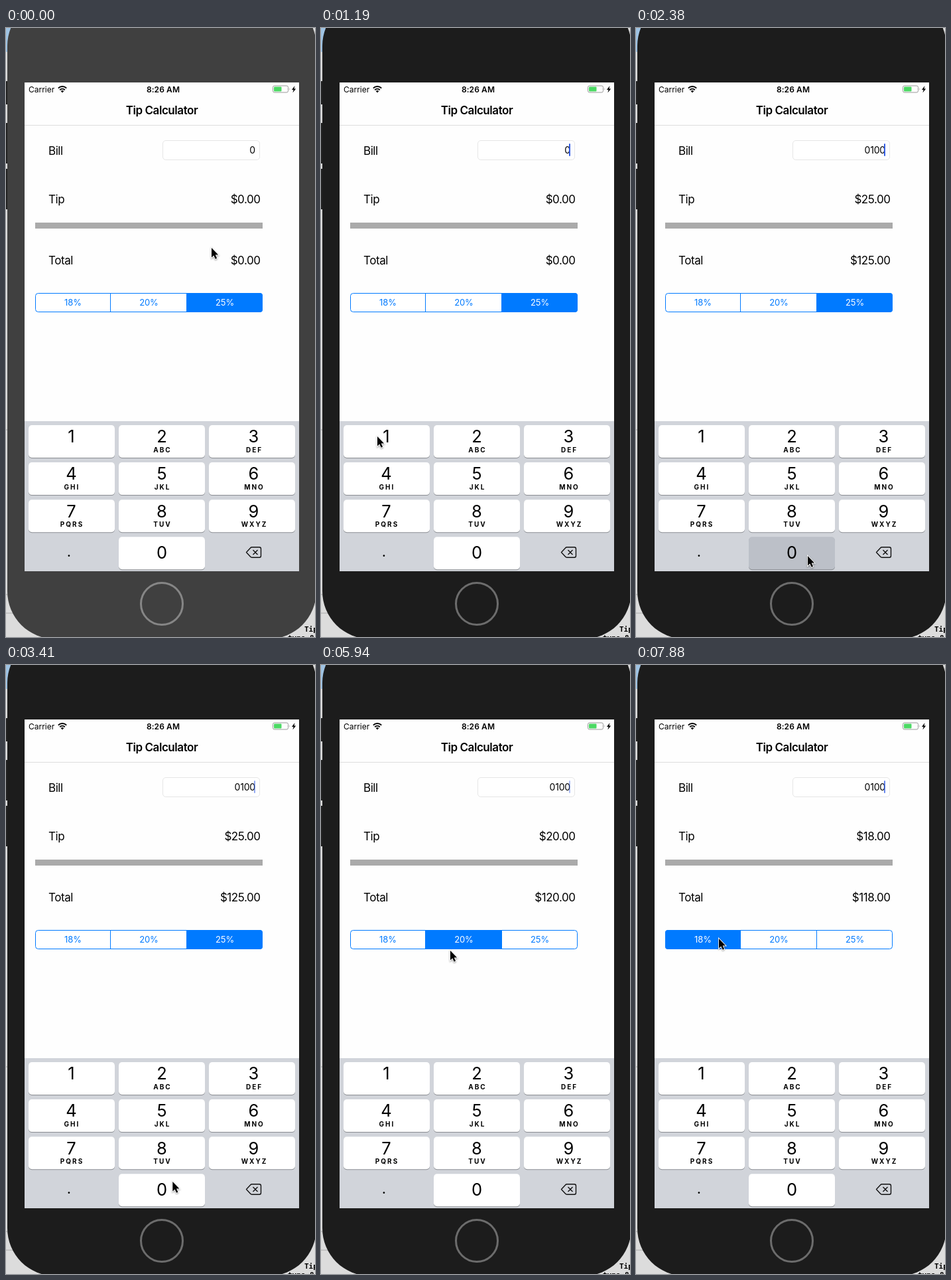
These frames come from a looping animation (466x917 px, 8000 ms). An HTML page:

```html
<!DOCTYPE html>
<html lang="en">
<head>
<meta charset="utf-8">
<title>Tip Calculator</title>
<style>
html, body { margin: 0; width: 100%; height: 100%; overflow: hidden; background: #dcdcdc; }
svg { display: block; width: 466px; height: 917px; font-family: Inter, sans-serif; }
.label { font-size: 17px; letter-spacing: -.45px; }
.end { text-anchor: end; }
.mid { text-anchor: middle; }
.digit { font-size: 25.5px; }
.letters { font-size: 10px; font-weight: 700; letter-spacing: 2px; }
.seg { font-size: 13px; letter-spacing: -.1px; }
.mono { font: 700 11px "DejaVu Sans Mono", monospace; }
.bold { font-weight: 600; }
</style>
</head>
<body>
<svg viewBox="0 0 466 917">
  <rect width="466" height="917" fill="#dcdcdc"/>
  <rect width="12" height="36" fill="#9fc3e3"/>
  <path d="M0 605h3M0 853h6M0 881h30" stroke="#aaa"/>
  <text class="mono" x="450" y="909">Tip</text>
  <text class="mono" x="425" y="922">type 8</text>
  <path d="M0 80h4v35h-4zM0 143h4v61h-4zM0 212h4v61h-4z" fill="#222"/>
  <rect id="body" x="2" y="-45" width="466" height="965" rx="72"/>
  <circle id="home" cx="235" cy="867" r="31.5" fill="none" stroke-width="3"/>
  <rect x="28" y="82" width="414" height="736" fill="#fefefe"/>

  <text x="34" y="97" font-size="12">Carrier</text>
  <g fill="none" stroke="#000" stroke-width="2">
    <path d="M78.8 90.6a9 9 0 0 1 12.4 0M81.2 93.2a5.6 5.6 0 0 1 7.6 0"/>
  </g>
  <path d="M85 97.5l-2.3-2.4a3.3 3.3 0 0 1 4.6 0z"/>
  <text class="mid bold" x="237" y="97" font-size="12" letter-spacing=".1">8:26 AM</text>
  <rect x="402.5" y="87" width="23" height="10" rx="2.3" fill="none" stroke="#999"/>
  <rect x="404" y="88.5" width="11.5" height="7" rx="1" fill="#4cd964"/>
  <path d="M427 90v4q1.5-2 0-4z" fill="#999"/>
  <path d="M435.5 87l-4.5 6h2.6l-1.2 4.5 4.8-6h-2.7z"/>

  <text class="label mid bold" x="235" y="130">Tip Calculator</text>
  <path d="M28 146.5h414" stroke="#dedede"/>
  <text class="label" x="64" y="191">Bill</text>
  <text class="label" x="64" y="264">Tip</text>
  <text class="label" x="64" y="356">Total</text>
  <rect x="236.5" y="169.5" width="146" height="29" rx="4.5" fill="#fff" stroke="#e6e6e6"/>
  <text id="bill" class="end" x="376" y="189" font-size="14" letter-spacing="-.2"></text>
  <rect id="caret" x="374" y="174" width="2" height="19" rx="1" fill="#3560e6"/>
  <text id="tip" class="label end" x="383.5" y="264"></text>
  <text id="total" class="label end" x="383.5" y="356"></text>
  <path d="M44 293h343v9H44z" fill="#aaa"/>
  <clipPath id="round"><rect x="44" y="399" width="343" height="29" rx="4"/></clipPath>
  <g id="segments" clip-path="url(#round)"></g>
  <path d="M157.5 400v27M272.5 400v27" stroke="#007aff"/>
  <rect x="44.5" y="399.5" width="342" height="28" rx="4" fill="none" stroke="#007aff"/>

  <path d="M28 592h414v226H28z" fill="#d1d4da"/>
  <g id="keys"></g>
  <text class="mid" x="95" y="796" font-size="22">.</text>
  <path d="M362.5 789.5l6-6.5q1-1.2 2.5-1.2h11q2.5 0 2.5 2.5v10.4q0 2.5-2.5 2.5h-11q-1.5 0-2.5-1.2zM372.5 786l7 7M379.5 786l-7 7"
        fill="none" stroke="#111" stroke-width="1.4" stroke-linejoin="round"/>
  <path id="cursor" d="M0 0v14.6l3.3-3.1 2.4 5.3 2.4-1-2.4-5.2h4.4z" stroke="#fff" stroke-width="1.8"
        paint-order="stroke" style="filter:drop-shadow(0 1px 1px #0006)"/>
</svg>
<script>
const $ = id => document.getElementById(id);
const LOOP = 8000, STEP = 148.6;
const RATES = [18, 20, 25], EDGES = [44, 157.5, 272.5, 387];
const CENTERS = [98.5, 235, 373.5];
const LETTERS = ['', 'ABC', 'DEF', 'GHI', 'JKL', 'MNO', 'PQRS', 'TUV', 'WXYZ'];

// time, x, y of the pointer
const PATH = [
  [0, 310, 331], [1040, 85, 615], [1400, 85, 615], [1790, 263, 802], [2200, 259, 795],
  [3340, 259, 795], [3900, 113, 470], [4450, 192, 413], [4750, 228, 411], [5040, 212, 411],
  [5400, 210, 412], [5940, 195, 430], [6380, 127, 413], [6530, 125, 411], [8000, 125, 412]
];
// key, moment its digit appears, moment the key is released
const PRESSES = [[1, 1330, 1480], [0, 1930, 2075], [0, 2370, 2520]];

$('segments').innerHTML = RATES.map((rate, i) =>
  `<rect id="seg${i}" x="${EDGES[i]}" y="399" width="${EDGES[i + 1] - EDGES[i]}" height="29"/>
   <text id="rate${i}" class="seg mid" x="${[101, 215.5, 330][i]}" y="418">${rate}%</text>`).join('');

function keyMarkup(digit, col, row, letters) {
  const x = 34 + col * 136, y = 598 + row * 56.1;
  return `<rect x="${x}" y="${y + 1}" width="130" height="49" rx="5" fill="#898c91"/>
    <rect id="key${digit}" x="${x}" y="${y}" width="130" height="49" rx="5"/>
    <text class="digit mid" x="${CENTERS[col]}" y="${y + (digit ? 26.3 : 32.5)}">${digit}</text>
    <text class="letters mid" x="${CENTERS[col] + 1}" y="${y + 41}">${letters}</text>`;
}
$('keys').innerHTML = LETTERS.map((s, i) => keyMarkup(i + 1, i % 3, Math.floor(i / 3), s)).join('')
  + keyMarkup(0, 1, 3, '');
for (let d = 0; d < 10; d++) $('key' + d).setAttribute('fill', '#fff');

const clamp = v => Math.max(0, Math.min(1, v));

function pointer(t) {
  const i = Math.max(1, PATH.findIndex(p => p[0] >= t));
  const [t0, x0, y0] = PATH[i - 1], [t1, x1, y1] = PATH[i];
  const u = clamp((t - t0) / (t1 - t0)), e = u * u * (3 - 2 * u);
  return [x0 + (x1 - x0) * e, y0 + (y1 - y0) * e];
}

function caretOpacity(t) {
  if (t > 1180 && t < 2830) return 1;
  const origin = t < 1180 ? 100 : 410;
  const phase = ((t - origin + 1100) / 1000) % 1;
  return Math.min(clamp(phase / .2), clamp((.71 - phase) / .19));
}

function draw(t) {
  const active = t > 1180;
  $('body').setAttribute('fill', active ? '#1c1c1c' : '#404040');
  $('home').setAttribute('stroke', active ? '#6c6c6c' : '#868686');

  const bill = '0' + PRESSES.filter(p => t >= p[1]).map(p => p[0]).join('');
  const chosen = t < 5330 ? 2 : t < 6970 ? 1 : 0;
  const tip = bill * RATES[chosen] / 100;
  $('bill').textContent = bill;
  $('tip').textContent = '$' + tip.toFixed(2);
  $('total').textContent = '$' + (+bill + tip).toFixed(2);
  $('caret').setAttribute('opacity', caretOpacity(t));

  RATES.forEach((_, i) => {
    $('seg' + i).setAttribute('fill', i === chosen ? '#007aff' : '#fff');
    $('rate' + i).setAttribute('fill', i === chosen ? '#fff' : '#007aff');
  });
  for (const key of [0, 1]) {
    const down = PRESSES.some(p => p[0] === key && t >= p[1] - 130 && t < p[2]);
    $('key' + key).setAttribute('fill', down ? '#bcc0c8' : '#fff');
  }
  $('cursor').setAttribute('transform', `translate(${pointer(t)})`);
}

function tick() {
  const t = performance.now() % LOOP;
  draw(Math.floor((t + 12) / STEP) * STEP);
  requestAnimationFrame(tick);
}
tick();
</script>
</body>
</html>
```
